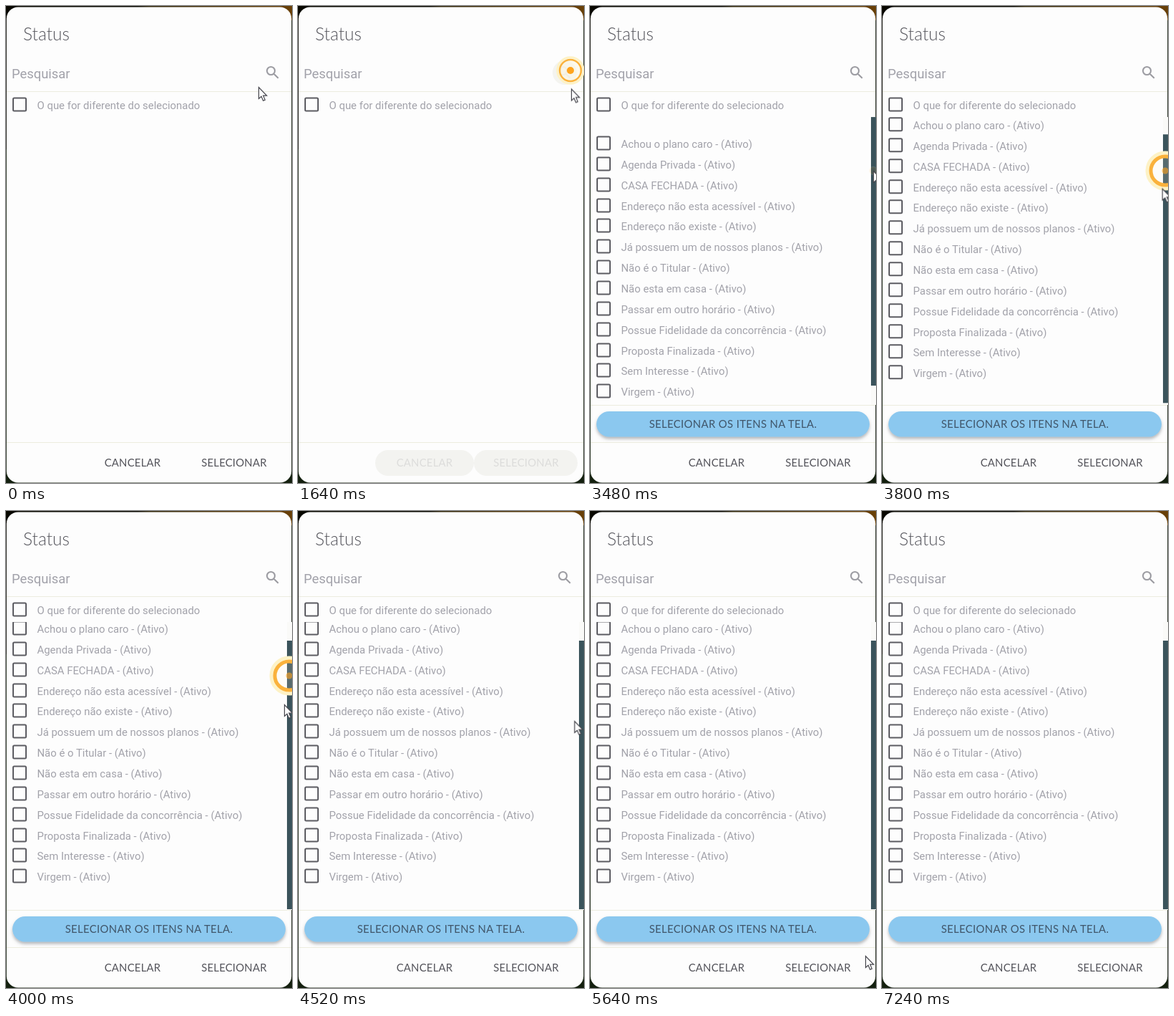
These frames come from a looping animation (400x666 px, 9040 ms). An HTML page:

```html
<!DOCTYPE html>
<html lang="pt-BR">
<head>
<meta charset="utf-8">
<title>Status</title>
<style>
html, body { margin: 0; width: 100%; height: 100%; overflow: hidden; background: #0c0e0a; }
svg { display: block; width: 400px; height: 666px; }
text { font-family: Roboto, sans-serif; font-size: 14.9px; fill: #a2a2aa; }
.caps, .title { font-family: Lato, sans-serif; fill: #55555c; }
.caps { text-anchor: middle; letter-spacing: .2px; }
.title { font-size: 24.5px; font-weight: 300; }
.search { font-size: 18.4px; }
.box { fill: none; stroke: #5c5c62; stroke-width: 2; }
.rule { stroke: #ececdf; }
.icon { fill: none; stroke: #9c9ca2; stroke-width: 2.1; }

.arrow, .list, .thumb, .results, .active, .busy, .click, .ring, .halo {
  animation: 9040ms linear infinite;
}
.arrow { animation-name: point, leave; animation-timing-function: linear, step-end; }
.list { animation-name: scroll; --dist: -28px; }
.thumb { animation-name: scroll; --dist: 26px; }
.results { animation-name: load; animation-timing-function: step-end; }
.active { animation-name: disable; }
.busy { animation-name: busy; }
.first { animation-name: tap; }
.first circle { animation-name: tap-ring; }
.second { animation-name: hold; }
.second circle { animation-name: hold-ring; }
.click .dot { animation: none; }

.ring { fill: none; stroke: #fab23c; }
.halo { fill: #fdf6dc; fill-opacity: .5; stroke: #fdf2c6; transform: scale(1.22); transform-box: fill-box; transform-origin: center; }
.dot { fill: #ffa41c; }

@keyframes point {
  0%, 2.65% { transform: translate(353px, 113px); }
  6.2%, 9.3% { transform: translate(384px, 98px); }
  9.73%, 16.4% { transform: translate(381px, 90px); }
  18.14% { transform: translate(382px, 115px); }
  24.78% { transform: translate(368px, 360px); }
  28.76% { transform: translate(384px, 292px); }
  32.74%, 34.5% { transform: translate(393px, 235px); }
  36.73%, 38.5% { transform: translate(396px, 230px); }
  44.25% { transform: translate(389px, 270px); }
  49% { transform: translate(388px, 277px); }
  57.08% { transform: translate(375px, 405px); }
  58.6% { transform: translate(376px, 447px); }
  62.39%, 100% { transform: translate(385px, 621px); }
}
@keyframes leave { 0% { opacity: 1; } 79.64%, 100% { opacity: 0; } }
@keyframes scroll {
  0%, 38.5% { transform: none; }
  42.3%, 100% { transform: translateY(var(--dist)); }
}
@keyframes load { 0% { visibility: hidden; } 22.56%, 100% { visibility: visible; } }
@keyframes disable {
  0%, 14.6%, 24%, 100% { opacity: 1; }
  16.4%, 22.56% { opacity: .14; }
}
@keyframes busy {
  0%, 14.6%, 24%, 100% { opacity: 0; }
  16.4%, 22.56% { opacity: 1; }
}
@keyframes tap {
  0%, 14.55%, 21%, 100% { opacity: 0; }
  15%, 18.6% { opacity: 1; }
}
@keyframes tap-ring {
  0%, 14.6% { r: 4px; stroke-width: 2px; }
  16.4% { r: 20px; stroke-width: 5px; }
  18.14% { r: 15px; stroke-width: 2.5px; }
  21%, 100% { r: 7px; stroke-width: 1px; }
}
@keyframes hold {
  0%, 38.45%, 48.2%, 100% { opacity: 0; }
  38.9%, 45.5% { opacity: 1; }
}
@keyframes hold-ring {
  0%, 38.5% { r: 4px; stroke-width: 2px; }
  40.7%, 44.7% { r: 20px; stroke-width: 5px; }
  48.2%, 100% { r: 7px; stroke-width: 1px; }
}
</style>
</head>
<body>
<svg viewBox="0 0 400 666">
  <defs>
    <linearGradient id="top"><stop offset=".46" stop-color="#080700"/><stop offset=".5" stop-color="#30260a"/><stop offset="1" stop-color="#694008"/></linearGradient>
    <clipPath id="view"><path d="M0 155H400V557H0Z"/></clipPath>
    <filter id="shadow" x="-5%" y="-30%" width="110%" height="180%">
      <feDropShadow dx="0" dy="3" stdDeviation="2.2" flood-color="#6a7078" flood-opacity=".5"/>
    </filter>
  </defs>

  <path d="M0 0H400V666H0Z" fill="#14200f"/>
  <path d="M0 0H400V20H0Z" fill="url(#top)"/>
  <path d="M0 20H2V200H0Z" fill="#080800"/>
  <rect x=".8" y="1.5" width="398.4" height="664" rx="16" fill="#fdfdfd"/>

  <text class="title" x="24" y="48">Status</text>
  <text class="search" x="8" y="101">Pesquisar</text>
  <circle class="busy" cx="373" cy="93" r="17" fill="#f4f4f0"/>
  <g class="active">
    <path class="icon" d="M374.4 94.4L380.8 100.8M376 90.5a5.5 5.5 0 1 0 -11 0a5.5 5.5 0 1 0 11 0"/>
  </g>
  <path class="rule" d="M1 119.5H399M1 609.5H399"/>
  <rect class="box" x="10" y="128.5" width="18" height="18" rx="1.5"/>
  <text x="43.5" y="144">O que for diferente do selecionado</text>

  <g class="results">
    <g clip-path="url(#view)">
      <g class="list" id="list"></g>
      <path d="M393 155H400V557H393Z" fill="#fafaf8"/>
      <path class="thumb" d="M393 155H400V530H393Z" fill="#3b545c"/>
    </g>
    <path class="rule" d="M1 557.5H399"/>
    <rect x="9" y="566" width="382" height="35.5" rx="17.75" fill="#8bc8ef" filter="url(#shadow)"/>
    <text class="caps" x="200" y="588.5" style="letter-spacing:.35px;fill:#40566a">SELECIONAR OS ITENS NA TELA.</text>
  </g>

  <g class="busy" fill="#f3f3f0">
    <rect x="108" y="620" width="138" height="36" rx="18"/>
    <rect x="246" y="620" width="145" height="36" rx="18"/>
  </g>
  <g class="active">
    <text class="caps" x="177" y="643">CANCELAR</text>
    <text class="caps" x="319" y="643">SELECIONAR</text>
  </g>

  <g class="click first">
    <circle class="halo" cx="381" cy="90" r="4"/>
    <circle class="ring" cx="381" cy="90" r="4"/>
    <circle class="dot" cx="381" cy="90" r="5"/>
  </g>
  <g class="click second">
    <circle class="halo" cx="396" cy="230" r="4" style="fill-opacity:.15"/>
    <circle class="ring" cx="396" cy="230" r="4"/>
    <circle class="dot" cx="396" cy="230" r="4.5" opacity=".6"/>
  </g>

  <path class="arrow" d="M.5 .5V16.5L4.1 13.2L6.7 19.2L9.3 18.1L6.8 12.2H11.7Z" fill="#fefefe" stroke="#45454c" stroke-width="1.2"/>
</svg>
<script>
const items = [
  "Achou o plano caro", "Agenda Privada", "CASA FECHADA", "Endereço não esta acessível",
  "Endereço não existe", "Já possuem um de nossos planos", "Não é o Titular", "Não esta em casa",
  "Passar em outro horário", "Possue Fidelidade da concorrência", "Proposta Finalizada",
  "Sem Interesse", "Virgem"
];
document.getElementById("list").innerHTML = items.map((name, i) => {
  const y = 191 + i * 28.85;
  return `<rect class="box" x="10" y="${Math.round(y) - 8.5}" width="18" height="18" rx="1.5"/>
    <text x="43.5" y="${Math.round(y + 7)}">${name} - (Ativo)</text>`;
}).join("");
</script>
</body>
</html>
```
